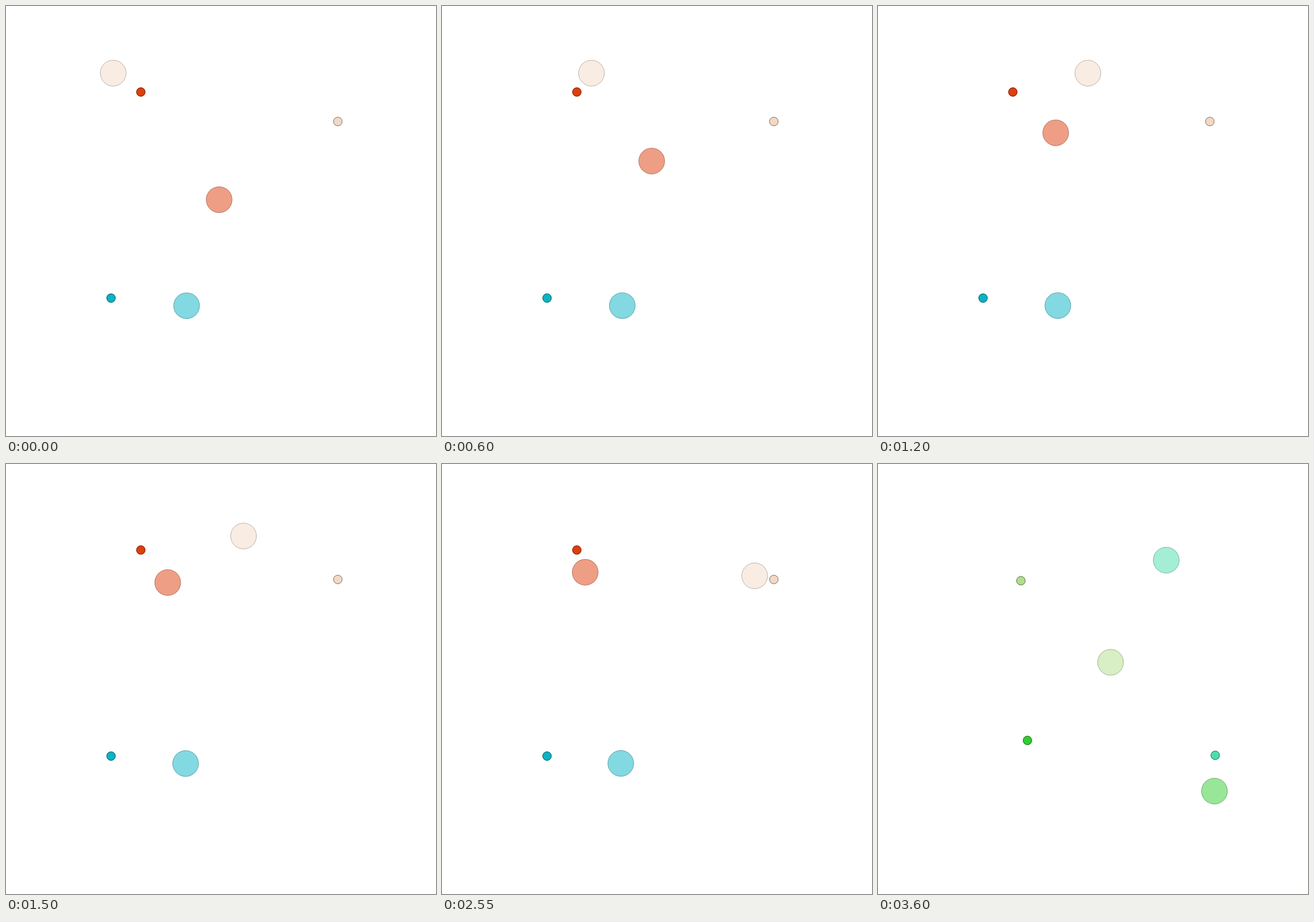
These frames come from a looping animation (700 px wide and 700 px high, 3.75 s). An HTML page with a canvas:

```html
<!DOCTYPE html>
<html lang="en">
<head>
<meta charset="utf-8">
<title>Drifting circles</title>
<style>
  html, body { margin: 0; width: 100%; height: 100%; overflow: hidden; background: #fff; }
  canvas { display: block; width: 700px; height: 700px; }
</style>
</head>
<body>
<canvas id="stage"></canvas>
<script>
const SIZE = 700, LOOP = 3750, STEP = 150, LAST = 24;
const RED = '#dd3f0d', BEIGE = '#f2d9c7', TEAL = '#09b3c3';
const LIME = '#32cd32', OLIVE = '#b1de8a', AQUA = '#4dddad';

const canvas = document.getElementById('stage');
const ctx = canvas.getContext('2d');
const ratio = window.devicePixelRatio || 1;
canvas.width = canvas.height = SIZE * ratio;
ctx.scale(ratio, ratio);

// Key points of each path: [step, x, y].
const creamPath = [
  [0, 174.5, 109.3], [4, 243.3, 109.3], [8, 341.7, 109.3], [9, 367, 110],
  [13, 442, 143], [17, 509, 182], [21, 545, 208], [23, 548, 211]
];
const coralPath = [
  [0, 347, 315.3], [4, 341.4, 252.4], [8, 289.3, 206.4], [9, 272, 198],
  [13, 243.3, 181], [17, 233.1, 176.2], [21, 226.5, 173], [23, 224.5, 172.3]
];
const tealPath = [[0, 294, 487.9], [23, 290.2, 487.2]];

// Slope at key i; the path eases at both ends.
function slope(path, i, axis) {
  const a = path[Math.max(i - 1, 0)];
  const b = path[Math.min(i + 1, path.length - 1)];
  const inner = i > 0 && i < path.length - 1;
  return (inner ? 1 : 0.6) * (b[axis] - a[axis]) / (b[0] - a[0]);
}

// Smooth cubic curve through the key points.
function along(path, step) {
  let i = 0;
  while (i < path.length - 2 && step >= path[i + 1][0]) i++;
  const a = path[i], b = path[i + 1];
  const span = b[0] - a[0], u = (step - a[0]) / span, v = 1 - u;
  return [1, 2].map(axis =>
    v * v * (1 + 2 * u) * a[axis] + u * u * (3 - 2 * u) * b[axis] +
    span * u * v * (v * slope(path, i, axis) - u * slope(path, i + 1, axis)));
}

function disc([x, y], r, color, alpha) {
  const ring = radius => {
    ctx.beginPath();
    ctx.arc(x, y, radius, 0, Math.PI * 2);
  };
  ctx.globalAlpha = alpha;
  ctx.fillStyle = color;
  ring(r + 0.5);
  ctx.fill();
  ctx.strokeStyle = 'rgba(0, 0, 0, 0.45)';
  ring(r);
  ctx.stroke();
}
const big = (point, color) => disc(point, 21, color, 0.5);
const small = (point, color) => disc(point, 7, color, 1);

function drawWarm(step) {
  big(along(creamPath, step), BEIGE);
  big(along(coralPath, step), RED);
  big(along(tealPath, step), TEAL);
  small([219.5, 140], RED);
  small([540.2, 188], BEIGE);
  small([171, 475.5], TEAL);
}

function drawGreen() {
  big([469.2, 156.5], AQUA);
  big([378.6, 322.8], OLIVE);
  big([547.7, 532.5], LIME);
  small([232.6, 190], OLIVE);
  small([243.3, 450], LIME);
  small([549, 474.2], AQUA);
}

function frame() {
  const step = Math.floor((performance.now() % LOOP) / STEP);
  ctx.clearRect(0, 0, SIZE, SIZE);
  if (step < LAST) drawWarm(step);
  else drawGreen();
  requestAnimationFrame(frame);
}
frame();
</script>
</body>
</html>
```
